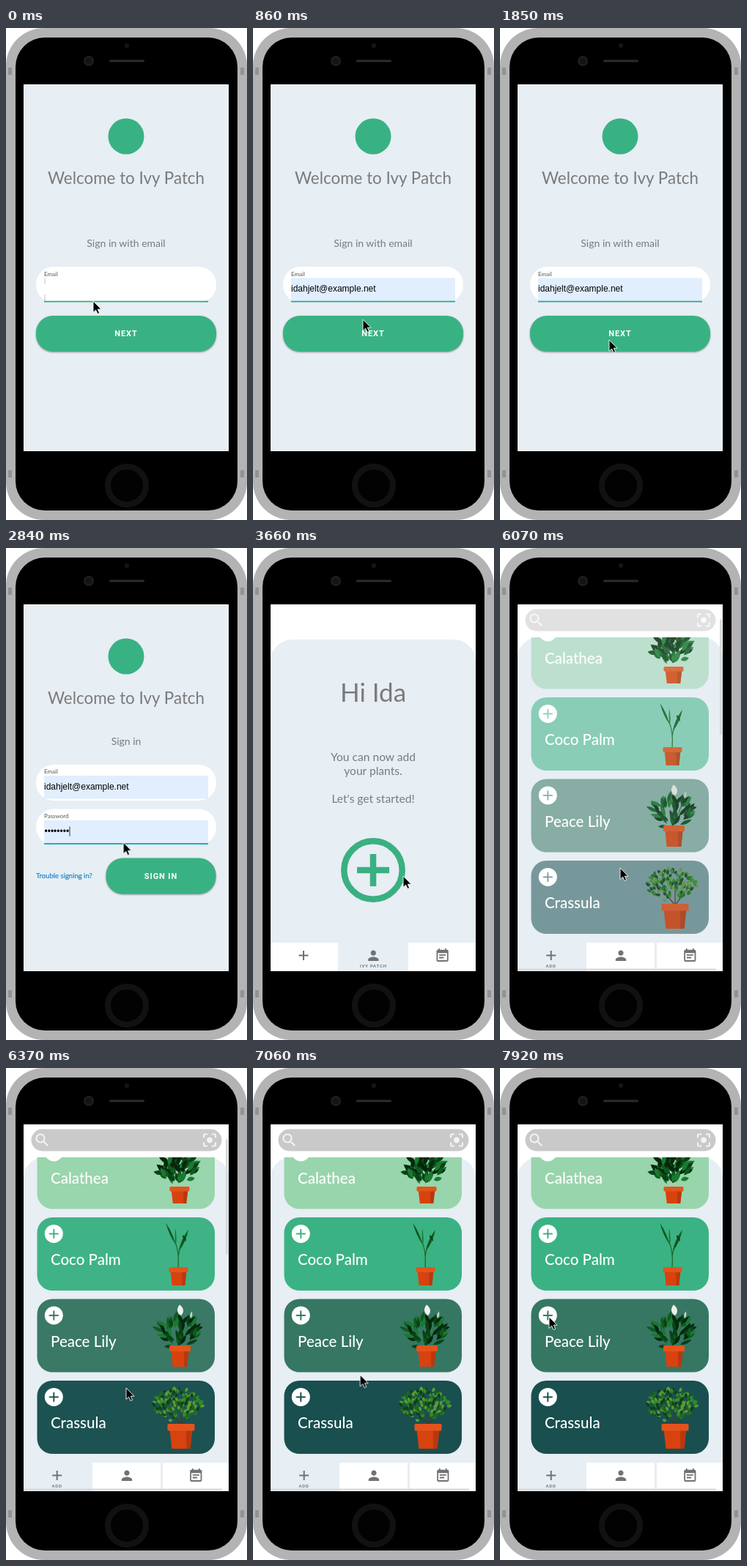
Animation, 329 px wide and 672 px high, one loop 8 s. Source, as an HTML page:

```html
<!DOCTYPE html>
<html lang="en">
<head>
<meta charset="utf-8">
<title>Plant app</title>
<style>
html, body { margin: 0; width: 100%; height: 100%; overflow: hidden; background: #fff; }
svg { display: block; width: 100vw; height: 100vh; }
text { font-family: Lato, sans-serif; fill: #7b7b7b; }
.mid { text-anchor: middle; }
.title { font-size: 22.4px; }
.sub { font-size: 14px; }
.lead { font-size: 15.6px; }
.hello { font-size: 35px; }
.label { font-size: 8px; fill: #555; }
.value { font: 12px "Liberation Sans", Arial, sans-serif; fill: #000; }
.btn { font: 700 11px Roboto, sans-serif; letter-spacing: .9px; fill: #fff; }
.link { font-size: 9.5px; fill: #1583c6; stroke: #1583c6; stroke-width: .2; }
.tab { font: 500 6px Roboto, sans-serif; letter-spacing: .8px; fill: #666; }
.name { font-size: 20.5px; font-weight: 500; fill: #fff; }
.fill { fill: #e1eefe; }
.panel { fill: #e7eef4; }
.green { fill: #39b283; }
.icon { fill: #727272; }
.raised { filter: drop-shadow(0 1px 1.2px rgba(0, 0, 0, .4)); }

.caret, .typed, .first, .second, .list, .fade, .soft, .bar { animation: 8s step-end infinite; }
.caret { animation-name: caret; }
.typed { animation-name: typed; }
.first { animation-name: first; }
.second { animation-name: second; }
.list { animation-name: list; }
.fade { animation-name: fade; }
.soft { animation-name: soft; }
.bar { animation-name: bar; }
.home { animation: home 8s linear infinite; }
.head { animation: head 8s linear infinite; }
.pointer { animation: pointer 8s linear infinite; }

@keyframes caret { 0% { opacity: 1 } 3.75%, 100% { opacity: 0 } }
@keyframes typed { 0% { opacity: 0 } 10.75%, 100% { opacity: 1 } }
@keyframes first { 0% { opacity: 1 } 28.5%, 100% { opacity: 0 } }
@keyframes second { 0% { opacity: 0 } 28.5% { opacity: 1 } 46%, 100% { opacity: 0 } }
@keyframes home { 0%, 40.87% { opacity: 0 } 40.875% { opacity: .3 } 45.75%, 100% { opacity: 1 } }
@keyframes head { 0%, 47.8% { opacity: 0 } 47.875% { opacity: .35 } 51.125%, 100% { opacity: 1 } }
@keyframes list { 0% { opacity: 0 } 74.25%, 100% { opacity: 1 } }
@keyframes fade {
  0% { opacity: .25 } 75.875% { opacity: .54 } 78% { opacity: .8 }
  79.625% { opacity: .98 } 81.25%, 100% { opacity: 1 }
}
@keyframes soft { 0% { opacity: .5 } 75.875% { opacity: .8 } 78% { opacity: .92 } 79.625%, 100% { opacity: 1 } }
@keyframes bar { 0% { opacity: 1 } 81.25% { opacity: .5 } 85%, 100% { opacity: 0 } }
@keyframes pointer {
  0%, 3.75% { transform: translate(119px, 373px) }
  10.75%, 16.125% { transform: translate(150px, 398px) }
  21%, 28.5% { transform: translate(149px, 426px) }
  33.4%, 35.5% { transform: translate(160px, 402px) }
  39%, 54% { transform: translate(205px, 448px) }
  60.25%, 67.25% { transform: translate(176px, 443px) }
  74.25% { transform: translate(164px, 437px) }
  85% { transform: translate(164px, 437px); animation-timing-function: ease-in-out }
  96%, 100% { transform: translate(67px, 340px) }
}
</style>
</head>
<body>
<svg viewBox="0 0 329 672">
  <defs>
    <clipPath id="screen"><path d="M24.500 78h279v499.500H24.500z"/></clipPath>
    <clipPath id="scroll"><path d="M24 122h280v417H24z"/></clipPath>
    <rect id="field" x="41" width="246" height="49" rx="24" fill="#fff"/>
    <path id="search" fill="#f4f4f4" d="M15.500 14h-.79l-.28-.27C15.410 12.590 16 11.110 16 9.500 16 5.910 13.090 3 9.500 3S3 5.910 3 9.500 5.910 16 9.500 16c1.610 0 3.090-.59 4.230-1.570l.27.28v.79l5 4.990L20.490 19l-4.990-5zm-6 0C7.010 14 5 11.990 5 9.500S7.010 5 9.500 5 14 7.010 14 9.500 11.990 14 9.500 14z"/>
    <path id="plus" d="M-6.500 0H6.500M0 -6.500V6.500" stroke-width="2"/>
    <path id="person" d="M12 12c2.210 0 4-1.790 4-4s-1.790-4-4-4-4 1.790-4 4 1.790 4 4 4zm0 2c-2.670 0-8 1.340-8 4v2h16v-2c0-2.660-5.330-4-8-4z"/>
    <path id="notes" d="M17 10H7v2h10v-2zm2-7h-1V1h-2v2H8V1H6v2H5c-1.110 0-1.990.9-1.990 2L3 19c0 1.100.89 2 2 2h14c1.100 0 2-.9 2-2V5c0-1.100-.9-2-2-2zm0 16H5V8h14v11zm-5-5H7v2h7v-2z"/>
    <g id="icons" class="icon">
      <use href="#plus" x="69" y="556.500" stroke="#727272" stroke-width="1.800"/>
      <use href="#person" transform="translate(153.500 546) scale(.9)"/>
      <use href="#notes" transform="translate(247.800 546) scale(.9)"/>
    </g>
  </defs>

  <!-- phone -->
  <rect width="329" height="672" rx="52" fill="#b3b3b3"/>
  <path d="M3 54h5v10h-5zM320 54h5v10h-5zM3 604h5v10h-5zM320 604h5v10h-5z" fill="#929292"/>
  <rect x="13" y="13" width="303" height="646" rx="40"/>
  <circle cx="113" cy="45" r="7" fill="#1e1e1e"/><circle cx="113" cy="45" r="4.500" fill="#141414"/>
  <rect x="141" y="43.500" width="48" height="3" rx="1.500" fill="#2c2c2c"/>
  <circle cx="165" cy="24" r="3.200" fill="#141414"/>
  <circle cx="165" cy="625" r="26" fill="#020202" stroke="#111" stroke-width="8"/>
  <path d="M24 77h280v501H24z" fill="#fff"/>

  <g clip-path="url(#screen)">
    <path class="panel" d="M24 78h280v500H24z"/>
    <circle class="green" cx="164" cy="148" r="24.500"/>
    <text class="title mid" x="164" y="213">Welcome to Ivy Patch</text>

    <g class="first">
      <text class="sub mid" x="164" y="299">Sign in with email</text>
      <use href="#field" y="326"/>
      <path class="caret" d="M53 342v8M53 364v9" stroke="#c4c4c4"/>
      <g class="typed">
        <path class="fill" d="M52 341.500h224v32H52z"/>
        <text class="value" x="52" y="360">idahjelt@example.net</text>
      </g>
      <text class="label" x="52" y="338.500">Email</text>
      <path d="M52 373.600h224" stroke="#2fa588" stroke-width="1.600"/>
      <rect class="green raised" x="41" y="393" width="246" height="49" rx="23"/>
      <text class="btn mid" x="164" y="421">NEXT</text>
    </g>

    <g class="second">
      <text class="sub mid" x="164" y="268.500">Sign in</text>
      <use href="#field" y="296"/>
      <path class="fill" d="M52 311h224v31.500H52z"/>
      <text class="label" x="52" y="308">Email</text>
      <text class="value" x="52" y="330">idahjelt@example.net</text>
      <use href="#field" y="356.500"/>
      <path class="fill" d="M52 372h224v31.500H52z"/>
      <text class="label" x="52" y="369">Password</text>
      <text class="value" x="52.500" y="391">••••••••</text>
      <path d="M87 380.500v13" stroke="#333"/>
      <path d="M52 404h224" stroke="#1db0ab" stroke-width="1.800"/>
      <text class="link" x="41" y="451">Trouble signing in?</text>
      <rect class="green raised" x="136.500" y="423.500" width="150" height="49" rx="23"/>
      <text class="btn mid" x="211.500" y="451.500">SIGN IN</text>
    </g>

    <g class="home">
      <path d="M24 78h280v500H24z" fill="#fff"/>
      <rect class="panel" x="24" y="125" width="280" height="480" rx="30"/>
      <g class="head">
        <rect x="45.500" y="86.500" width="222" height="30" rx="15" fill="#cfcfcf"/>
        <text x="74" y="105" font-size="11" style="fill:#cacaca">Search</text>
        <use href="#search" x="48.500" y="89.500"/>
        <path class="icon" transform="translate(272.400 88.400) scale(1.13)" d="M10.090 15.590L11.500 17l5-5-5-5-1.410 1.410L12.670 11H3v2h9.670l-2.580 2.590zM19 3H5c-1.110 0-2 .9-2 2v4h2V5h14v14H5v-4H3v4c0 1.100.89 2 2 2h14c1.100 0 2-.9 2-2V5c0-1.100-.9-2-2-2z"/>
      </g>
      <text class="hello mid" x="164" y="209.500">Hi Ida</text>
      <g class="lead mid">
        <text x="164" y="291">You can now add</text>
        <text x="164" y="310">your plants.</text>
        <text x="164" y="347.500">Let's get started!</text>
      </g>
      <g fill="none" stroke="#3ab082" stroke-width="8.500">
        <circle cx="164" cy="440" r="39.700"/><path d="M142 440h44M164 418v44"/>
      </g>
      <path d="M24 539h92v39H24zM212 539h92v39H212z" fill="#fff"/>
      <use href="#icons"/>
      <text class="tab mid" x="164.400" y="573">IVY PATCH</text>
    </g>

    <g class="list">
      <path d="M24 78h280v500H24z" fill="#fff"/>
      <rect class="panel" x="24" y="122" width="280" height="480" rx="28"/>
      <g id="cards" clip-path="url(#scroll)"></g>
      <g class="fade">
        <rect x="34.500" y="83.500" width="260" height="30" rx="15" fill="#c9c9c9"/>
        <use href="#search" x="37.500" y="86.500"/>
        <path transform="translate(266 86.500)" fill="#f4f4f4" d="M12 8c-2.210 0-4 1.790-4 4s1.790 4 4 4 4-1.790 4-4-1.790-4-4-4zm-7 7H3v4c0 1.100.9 2 2 2h4v-2H5v-4zM5 5h4V3H5c-1.100 0-2 .9-2 2v4h2V5zm14-2h-4v2h4v4h2V5c0-1.100-.9-2-2-2zm0 16h-4v2h4c1.100 0 2-.9 2-2v-4h-2v4z"/>
      </g>
      <rect class="bar" x="300" y="97" width="3" height="158" rx="1.500" fill="#d3dade"/>
      <path d="M118 539h186v39H118z" fill="#fff"/>
      <path d="M211 539h3v36h-3z" fill="#ececec"/>
      <path d="M24 574.500h271v2.500H24z" fill="#d9dbdd"/>
      <use href="#icons" x=".7"/>
      <text class="tab mid" x="69.600" y="573">ADD</text>
    </g>
  </g>

  <path class="pointer" d="M0 0V15.500L3.600 12.200 6 17.500 8.600 16.400 6.300 11.200H11Z" stroke="#fff" stroke-width=".9"/>
</svg>

<script>
const greens = ['#05280c', '#0a4216', '#0f5a20', '#1a7a30'];
const jade = ['#0f4016', '#1c6a1f', '#2f8a2a', '#5c9a34'];
let seed = 7;
const rand = (lo = 0, hi = 1) => {
  seed = (seed * 16807) % 2147483647;
  return lo + (hi - lo) * seed / 2147483647;
};
const pick = list => list[Math.floor(rand(0, list.length))];

const leaf = (x, y, angle, len, w, color) =>
  `<path transform="translate(${x} ${y}) rotate(${angle})" fill="${color}" d="M0 0Q${len * .45} ${-w} ${len} 0Q${len * .45} ${w} 0 0"/>`;

const pot = (x, y, w, h) => `
  <path d="M${x - w * .44} ${y}h${w * .88}l${-w * .1} ${h}h${-w * .68}z" fill="#d8420f"/>
  <path d="M${x + w * .18} ${y}h${w * .26}l${-w * .1} ${h}h${-w * .14}z" fill="#b8380e"/>
  <rect x="${x - w / 2}" y="${y}" width="${w}" height="${h * .28}" rx="1.500" fill="#e4531c"/>`;

// leaves scattered over an ellipse, pointing away from its foot
function bush(x, y, rx, ry, count, len, w, colors) {
  let out = '';
  for (let i = 0; i < count; i++) {
    const a = rand(0, Math.PI * 2), r = Math.sqrt(rand()) * .8;
    const px = x + Math.cos(a) * r * rx, py = y + Math.sin(a) * r * ry;
    const dir = Math.atan2(py - y - ry, px - x) * 180 / Math.PI + rand(-40, 40);
    out += leaf(px, py, dir, rand(.7, 1) * len, w, pick(colors));
  }
  return out;
}

const stems = (d, color) => `<path d="${d}" fill="none" stroke="${color}" stroke-width="1.300"/>`;

const plants = [
  () => bush(235, 142, 26, 22, 75, 16, 6, greens) + pot(237, 162, 27, 23),
  () => stems('M235 273Q237 250 230 236M235 258Q237 245 241 236', '#1f6a2a') +
    leaf(231, 240, -114, 31, 3, greens[2]) + leaf(236, 250, -66, 32, 4, greens[2]) +
    leaf(232, 243, -92, 24, 2, greens[3]) + leaf(241, 228, 60, 10, 3, greens[1]) +
    pot(235.5, 272, 26, 25),
  () => stems('M237 378L238 332M238 378L252 340', '#2c7a34') +
    bush(235, 364, 29, 22, 52, 18, 5, greens) +
    leaf(239, 338, -98, 15, 8, '#eef0e6') + leaf(252, 342, -80, 10, 3, '#c9d5bd') +
    pot(237.5, 379, 29, 29),
  () => stems('M239 488L218 462M239 488V456M239 488L258 462', '#4a3a20') +
    bush(234, 462, 39, 26, 140, 8, 4, jade) + pot(239, 486, 37, 34),
];

const cards = [
  ['Calathea', '#98d5ac'], ['Coco Palm', '#3bb283'],
  ['Peace Lily', '#357763'], ['Crassula', '#194f4f'],
];

document.getElementById('cards').innerHTML = cards.map(([name, color], i) => {
  const y = 92.4 + 111.5 * i;
  return `<rect class="fade" x="42.500" y="${y}" width="242.500" height="100.200" rx="21" fill="${color}"/>
    <circle cx="65.300" cy="${y + 22.5}" r="12.500" fill="#fff"/>
    <use class="fade" href="#plus" x="65.300" y="${y + 22.5}" stroke="${color}"/>
    <text class="name" x="61" y="${y + 65.3}">${name}</text>
    <g class="soft">${plants[i]()}</g>`;
}).join('');
</script>
</body>
</html>
```
